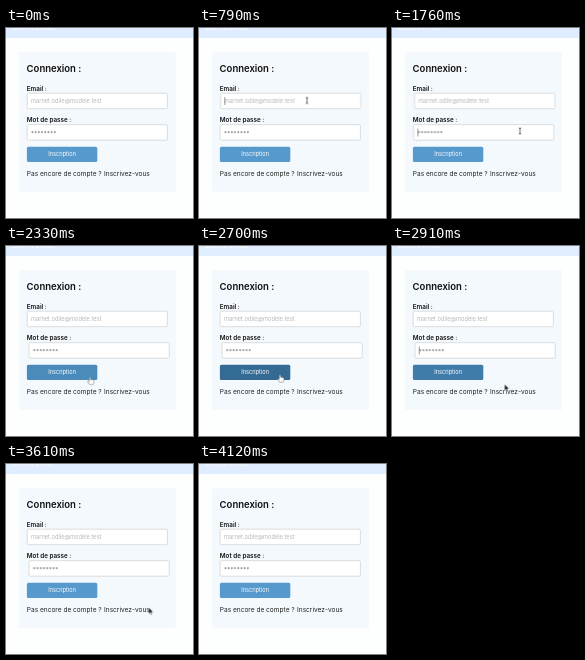
Animation of 187 by 190 pixels, one loop 4.15 s. Source, as an HTML page:

```html
<!DOCTYPE html>
<html lang="fr">
<head>
<meta charset="utf-8">
<title>Connexion</title>
<style>
  html, body { margin: 0; width: 100%; height: 100%; overflow: hidden; background: #fdfefe; }
  svg { display: block; width: 187px; height: 190px; font-family: Inter, "Open Sans", sans-serif; }
  text { fill: #222; font-size: 6.57px; white-space: pre; }
  .title { font-size: 9.5px; font-weight: 600; fill: #111; }
  .label { font-size: 6.3px; font-weight: 600; fill: #111; }
  .hint { font-size: 5.7px; fill: #b4b7ba; }
  .stars { fill: #66686b; letter-spacing: .35px; }
  .box { fill: #fff; stroke: #d2d5d8; stroke-width: .8; }
  .caret { stroke: #444; stroke-width: .6; }

  /* One shared 4150 ms clock for every part */
  .email, .pass, .button, .link, .caret, .pointer, .pointer > g {
    animation: 4150ms linear infinite;
  }
  .email { animation-name: email; }
  .pass { animation-name: pass; }
  .button { fill: #5599cd; animation-name: button; }
  .link { animation-name: link; }
  .pointer { animation-name: path; animation-timing-function: ease-in-out; }
  .email .caret { animation-name: emailCaret; }
  .pass .caret { animation-name: passCaret; }
  .pointer > .arrow { animation-name: arrow; }
  .pointer > .beam { animation-name: beam; }
  .pointer > .hand { animation-name: hand; }
  .caret, .pointer > g { opacity: 0; animation-timing-function: step-end; }

  @keyframes email {
    0%, 17.8% { transform: none; }
    25%, 40.8% { transform: translateX(1.8px); }
    48%, 100% { transform: none; }
  }
  @keyframes pass {
    0%, 40.8% { transform: none; }
    48%, 96% { transform: translateX(1.8px); }
    99.2%, 100% { transform: none; }
  }
  @keyframes button {
    0%, 54% { fill: #5599cd; }
    61.2%, 67.5% { fill: #346b94; }
    74.7%, 100% { fill: #5599cd; }
  }
  @keyframes link {
    0%, 72% { stroke: #0000; fill: #222; }
    74%, 82.5% { stroke: #111; fill: #111; }
    84.5%, 100% { stroke: #0000; fill: #222; }
  }
  @keyframes emailCaret {
    0% { opacity: 0; }
    17.8% { opacity: 1; }
    29.9%, 100% { opacity: 0; }
  }
  @keyframes passCaret {
    0% { opacity: 0; }
    41% { opacity: 1; }
    53.1% { opacity: 0; }
    65.3% { opacity: 1; }
    77.3% { opacity: 0; }
    89.4% { opacity: 1; }
    97%, 100% { opacity: 0; }
  }
  @keyframes path {
    0%, 8% { transform: translate(190px, 49px); }
    17%, 21.9% { transform: translate(108px, 72.5px); }
    29% { transform: translate(133px, 85px); }
    34.3% { transform: translate(138px, 97px); }
    41%, 48.2% { transform: translate(128px, 103px); }
    56.1% { transform: translate(84px, 131.2px); }
    60.7%, 65.1% { transform: translate(81px, 128.8px); }
    73.8%, 82.2% { transform: translate(130.6px, 143.5px); }
    97.8%, 100% { transform: translate(191px, 143px); }
  }
  @keyframes arrow {
    0% { opacity: 0; }
    8.4% { opacity: 1; }
    14.5% { opacity: 0; }
    25.3% { opacity: 1; }
    34.2% { opacity: 0; }
    50.5% { opacity: 1; }
    53.5% { opacity: 0; }
    67.5% { opacity: 1; }
    72% { opacity: 0; }
    85.5% { opacity: 1; }
    97.8%, 100% { opacity: 0; }
  }
  @keyframes beam {
    0% { opacity: 0; }
    14.5% { opacity: 1; }
    25.3% { opacity: 0; }
    34.2% { opacity: 1; }
    50.5%, 100% { opacity: 0; }
  }
  @keyframes hand {
    0% { opacity: 0; }
    53.5% { opacity: 1; }
    67.5% { opacity: 0; }
    72% { opacity: 1; }
    85.5%, 100% { opacity: 0; }
  }
</style>
</head>
<body>
<svg viewBox="0 0 187 190">
  <rect width="187" height="10" fill="#e0ecff"/>
  <text x="6" y="1.6" style="font-size:8.6px;font-weight:600;fill:#f8fbff">Bienvenue</text>
  <rect x="13" y="24" width="157" height="140" rx="1" fill="#f4f9fd"/>

  <text class="title" x="20.6" y="43.5">Connexion :</text>
  <text class="label" x="20.8" y="62.5">Email :</text>
  <g class="email">
    <rect class="box" x="21.2" y="65.2" width="140.2" height="15.5" rx="1"/>
    <text class="hint" x="25" y="75">marnet.odile@modele.test</text>
    <path class="caret" d="M25.4 69v8"/>
  </g>

  <text class="label" x="20.8" y="94.1">Mot de passe :</text>
  <g class="pass">
    <rect class="box" x="21.2" y="96.7" width="140.2" height="15.5" rx="1"/>
    <text class="hint stars" x="25" y="108">********</text>
    <path class="caret" d="M25.4 100.5v8"/>
  </g>

  <rect class="button" x="20.9" y="118.7" width="70.4" height="15.3" rx="1.5"/>
  <text x="56.1" y="128.2" text-anchor="middle" style="font-size:5.6px;fill:#fff">Inscription</text>
  <text x="20.8" y="147.5">Pas encore de compte ? <tspan class="link" x="98" stroke-width=".3">Inscrivez-vous</tspan></text>

  <g class="pointer">
    <g class="arrow">
      <path d="M0 0v6.6l1.6-1.4 1 2.3 1-.4-1-2.3h2.1z" fill="#111" stroke="#fff" stroke-width=".5"/>
    </g>
    <g class="beam" fill="none" stroke="#333" stroke-width=".7">
      <path d="M-1.3-3q1.3 0 1.3.7 0-.7 1.3-.7M0-2.5v5M-1.3 3q1.3 0 1.3-.7 0 .7 1.3.7"/>
    </g>
    <g class="hand">
      <path d="M-.7.5Q0-.6.7.5v2q.8-.4 1.2.2.8-.3 1.1.3 1-.1 1 .8v1.5L3.2 7.3H-.5L-2.4 4.5q0-1 .9-.6l.8.7z"
        fill="#fff" stroke="#555" stroke-width=".45" stroke-linejoin="round"/>
    </g>
  </g>
</svg>
</body>
</html>
```
